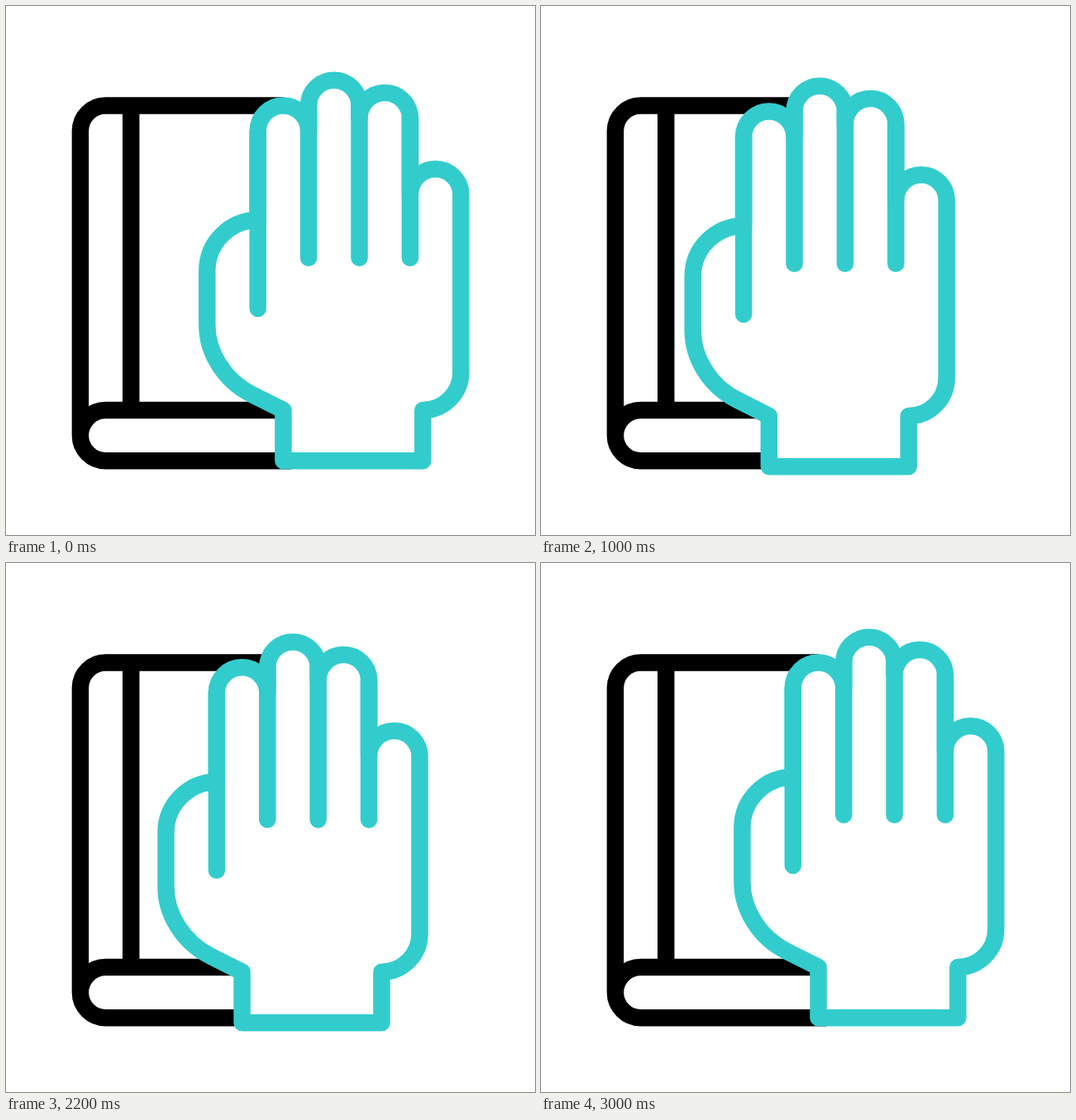
Write an HTML page with a canvas that moves like this. It is 640 by 640 pixels and loops after 3.6 s.

```html
<!DOCTYPE html>
<html lang="en">
<head>
<meta charset="utf-8">
<title>Hand on book</title>
<style>
  html, body { margin: 0; width: 100%; height: 100%; overflow: hidden; background: #fff; }
  canvas { display: block; width: 640px; height: 640px; }
</style>
</head>
<body>
<canvas id="stage" width="640" height="640"></canvas>
<script>
const ctx = document.getElementById('stage').getContext('2d');
const LOOP = 3600;
const SHIFT = { x: -61.5, y: 7.2 };
const R = 30.7;
const { PI } = Math;

// Book
const book = new Path2D();
book.moveTo(336, 120.4);
book.lineTo(120.6, 120.4);
book.arc(120.6, 151.1, R, -PI / 2, PI, true);
book.lineTo(89.9, 519.6);
book.arc(120.6, 519.6, R, PI, PI / 2, true);
book.lineTo(345, 550.3);
book.moveTo(89.9, 519.6);
book.arc(120.6, 519.6, R, PI, PI * 1.5);
book.lineTo(336, 488.9);
book.moveTo(151.2, 120.4);
book.lineTo(151.2, 488.9);

// Hand outline
const hand = new Path2D();
hand.moveTo(335.5, 488.9);
hand.lineTo(297.4, 469.8);
hand.bezierCurveTo(264.3, 453.2, 243.4, 419.5, 243.4, 386);
hand.lineTo(243.4, 320.3);
hand.arc(304.8, 320.3, 2 * R, PI, PI * 1.5);
const fingers = [[335.5, 151.1], [396.9, 120.4], [458.3, 135.8], [519.7, 227.9]];
for (const [x, y] of fingers) hand.arc(x, y, R, PI, 2 * PI);
hand.lineTo(550.4, 442.9);
hand.arc(504.4, 442.9, 46, 0, PI / 2);
hand.lineTo(504.4, 550.3);
hand.lineTo(335.5, 550.3);
hand.closePath();

// Gaps between the fingers
const gaps = new Path2D();
for (const [x, top, bottom] of [[304.8, 151, 366], [366.2, 121, 304.7], [427.6, 121, 304.7], [489, 136, 304.7]]) {
  gaps.moveTo(x, top);
  gaps.lineTo(x, bottom);
}

const clamp = v => Math.min(1, Math.max(0, v));
const easeOut = p => Math.sin(p * PI / 2);
const easeInOut = p => p * p * (3 - 2 * p);

// 0 = resting on the right, 1 = moved left
function slide(t) {
  return easeOut(clamp(t / 1185)) - easeInOut(clamp((t - 1898) / 1092));
}

function draw(t) {
  ctx.fillStyle = '#fff';
  ctx.fillRect(0, 0, 640, 640);
  ctx.lineWidth = 20.5;
  ctx.lineJoin = 'round';

  ctx.strokeStyle = '#000';
  ctx.lineCap = 'butt';
  ctx.stroke(book);

  const s = slide(t);
  ctx.save();
  ctx.translate(SHIFT.x * s, SHIFT.y * s);
  ctx.strokeStyle = '#33cccc';
  ctx.lineCap = 'round';
  ctx.fill(hand);
  ctx.stroke(hand);
  ctx.stroke(gaps);
  ctx.restore();
}

const start = performance.now();
function frame() {
  draw((performance.now() - start) % LOOP);
  requestAnimationFrame(frame);
}
frame();
</script>
</body>
</html>
```
